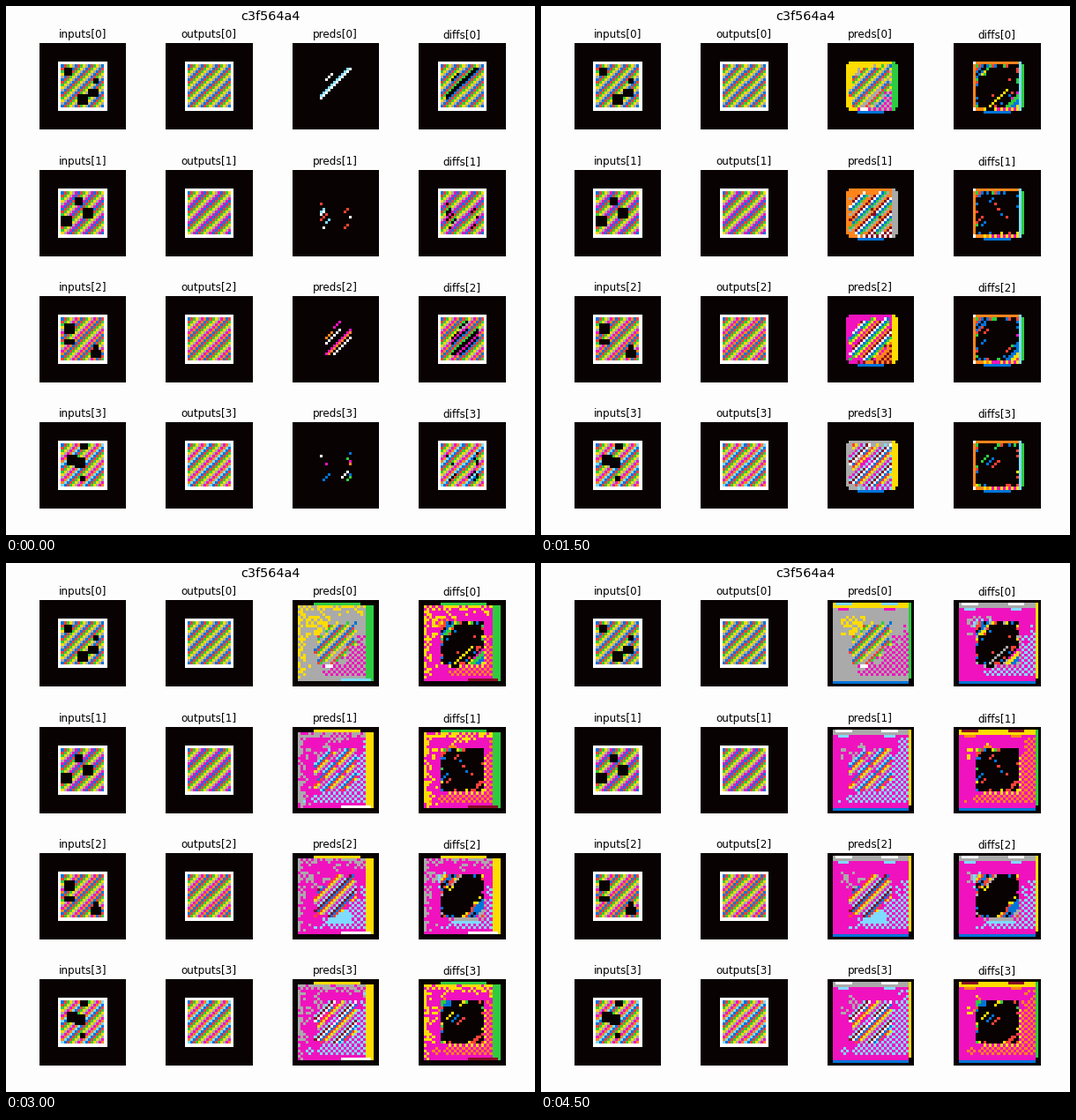
A matplotlib script that plays this animation: 600 px wide and 600 px high, repeating every 5 s.

```python
import matplotlib.pyplot as plt
import numpy as np
from matplotlib.animation import FuncAnimation

plt.rcParams["font.family"] = "DejaVu Sans"

HEX = ["080202", "0074d9", "ff4136", "2ecc40", "ffdc00", "aaaaaa",
       "f012be", "ff851b", "7fdbff", "870c25", "ffffff"]
PALETTE = np.array([list(bytes.fromhex(h)) for h in HEX], np.uint8)

SIZE, ROWS, STEPS = 32, 4, 10
R, C = np.mgrid[:SIZE, :SIZE]
S = R + C
CHECK = S % 2


def box(c0, c1, r0, r1):
    return (C >= c0) & (C <= c1) & (R >= r0) & (R <= r1)


GRID = box(8, 23, 8, 23)
FRAMED = box(7, 24, 7, 24)
INSET = np.minimum(np.minimum(R - 8, 23 - R), np.minimum(C - 8, 23 - C))

# Holes in each input: first column, last column, first row, last row
HOLES = [
    [(9, 11, 9, 11), (20, 21, 13, 14), (18, 21, 17, 19), (14, 17, 19, 22)],
    [(13, 15, 10, 12), (16, 19, 14, 17), (8, 11, 17, 20)],
    [(9, 12, 10, 13), (9, 12, 16, 17), (20, 21, 18, 19), (19, 22, 20, 22)],
    [(15, 17, 8, 9), (10, 13, 12, 15), (13, 16, 13, 16), (15, 16, 20, 21)],
]
GAPS = [np.any([box(*h) for h in holes], axis=0) for holes in HOLES]

# Values that each row predicts first
EARLY = [(4, 5), (1, 4, 5), (4, 5, 7), (1, 2, 4, 5, 7)]

rng = np.random.RandomState(11)
NOISE = rng.rand(ROWS, SIZE, SIZE)
NOISE2 = rng.rand(ROWS, SIZE, SIZE)


def goal(row):
    """Diagonal stripes with a cycle of 5 to 8 values in a white frame."""
    return np.where(GRID, (S - 16) % (5 + row) + 1, np.where(FRAMED, 10, 0))


GOALS = [goal(i) for i in range(ROWS)]


def first_guess(row):
    """A few runs along the diagonals: a band in even rows, a V in odd rows."""
    runs = NOISE[row][S % SIZE, C // 3]
    if row % 2:
        lit = (abs(C - 15.5) > 0.5 * (21 - R)) & (runs < 0.4)
    else:
        off = S - 30 - 2 * row
        lit = (abs(off) <= 2) | ((off < 0) & (off > -9) & (runs < 0.45))
    lit &= box(10, 21, 9, 21) & np.isin(GOALS[row], EARLY[row])
    return np.where(lit, GOALS[row], 0)


def second_guess(row):
    """Most of the grid is right; the holes stay open and the frame is ragged."""
    a, b = NOISE[row], NOISE2[row]
    v = np.where(GRID & (~GAPS[row] | (b > 0.8)), GOALS[row], 0)
    v[GRID & (INSET == 0) & (a > 0.6)] = 0
    v[FRAMED & ~GRID & (R > 7) & (a > 0.6)] = 10
    v[(box(9, 23, 8, 8) | box(23, 24, 8, 20)) & (a > 0.25)] = 5
    v[box(9, 22, 24, 24) & (a > 0.3) & (a < 0.6)] = 6
    return v


def spread(k):
    """Area reached so far: it grows with round corners, then squares off."""
    left = int(np.interp(k, [3, 5], [7, 2]))
    right = int(np.interp(k, [2, 5], [24, 29]))
    bottom = int(np.interp(k, [3, 5], [24, 29]))
    q = 2 * (k - 2) if k < 6 else 0
    dx = np.maximum(0, np.maximum(left + q - C, C - right + q))
    dy = np.maximum(0, np.maximum(left + q - R, R - bottom + q))
    return box(left, right, left, bottom) & (np.hypot(dx, dy) <= q + 0.5), bottom


def strip(v, r, mid, half, value):
    v[(R == r) & (abs(C - mid) <= half)] = value


def edges(v, k, bottom):
    if k == 3 or k >= 7:
        strip(v, bottom + 1, 15.5, np.interp(k, [3, 7, 9], [5, 11, 14]), 1)
    elif k > 3:
        strip(v, bottom, np.interp(k, [5, 6], [15, 23]), 5, 8)
    if k >= 6:
        strip(v, 1, 16, np.interp(k, [6, 7], [8, 14]), 3)
    if k >= 7:
        v[(R == 1) & (C > 2) & (C < 6)] = 8
        v[(R == 2) & (C > 1) & (C < 28)] = 4
    if k == 9:
        v[box(2, 29, 1, 2)] = 4
        wave = np.cos(2 * np.pi * (C - 5.5) / 17)
        v[(R == 1) & (wave > 0.5) & (C > 2)] = 8
        v[(R == 3) & (wave > 0.7) & (C > 2)] = 6
        v[box(30, 30, 2, 28)] = 3


def later_guess(k, row):
    a, b = NOISE[row], NOISE2[row]
    area, bottom = spread(k)
    v = np.where(area, 4, 0)

    # 5 takes over from the lower right, then a checkered 6
    depth = np.minimum(R, C) - (21 - 3 * k)
    v[area & (depth + 5 * (a - 0.5) + 2 * CHECK > 1)] = 5
    if k >= 5:
        v[box(5, 13, 6, 12) & (b > (0.75 if row else 0.45))] = 4
    six = (CHECK == 1) & (S + 8 * (a - 0.5) > 38 - 6 * (row % 2))
    v[area & six & (R <= 27)] = 6
    if k == 5:
        v[box(9, 26, 25, 26) & (b > 0.4)] = 1
    if row == 2 and k > 4:
        v[box(12, 22, 19, 25) & (abs(C - 17) <= 0.8 * (R - 18))] = 6
    v[area & (C >= np.interp(k, [3, 5, 7, 9], [24, 27, 27, 31]))] = 3
    edges(v, k, bottom)
    if row == 0:
        strip(v, 24, 13, 1, 10)

    # Stripes stay right in a diagonal band
    width = (11 if row % 2 else 8) + max(0, 5 - k)
    good = GRID & (abs(S - 31) + 3 * (a - 0.5) < width) & (INSET + 2 * b > 1)
    good &= ~(GAPS[row] & (S % 3 == 0))
    return np.where(good, GOALS[row], v)


def guess(k, row):
    if k == 0:
        return first_guess(row)
    return second_guess(row) if k == 1 else later_guess(k, row)


def paint(v, top):
    return PALETTE[np.minimum(v * 11 // top, 10)]


def diff_top(k, row):
    if k < 2:
        return 10
    return 8 if row % 2 == 0 and k + row // 2 > 6 else 9


fig = plt.figure(figsize=(6, 6), dpi=100, facecolor="#fefdfe")


def label(x, y, text, size):
    fig.text(x / 600, 1 - y / 600, text, ha="center", va="baseline", fontsize=size)


def panel(row, col, name):
    x, y, w = 37.9 + 143.3 * col, 42.1 + 143.45 * row, 98
    ax = fig.add_axes([x / 600, 1 - (y + w) / 600, w / 600, w / 600])
    ax.axis("off")
    label(x + w / 2, y - 6, f"{name}[{row}]", 8.64)
    return ax.imshow(paint(GOALS[row], 10), interpolation="nearest", aspect="auto")


label(299.5, 16.2, "c3f564a4", 10.37)
preds, diffs = [], []
for row in range(ROWS):
    panel(row, 0, "inputs").set_data(paint(np.where(GAPS[row], 0, GOALS[row]), 10))
    panel(row, 1, "outputs")
    preds.append(panel(row, 2, "preds"))
    diffs.append(panel(row, 3, "diffs"))


def update(k):
    for row in range(ROWS):
        v = guess(k, row)
        preds[row].set_data(paint(v, v.max()))
        diffs[row].set_data(paint(abs(GOALS[row] - v), diff_top(k, row)))
    return preds + diffs


anim = FuncAnimation(fig, update, frames=STEPS, interval=500, repeat=True,
                     repeat_delay=0, blit=False)
plt.show()
```
